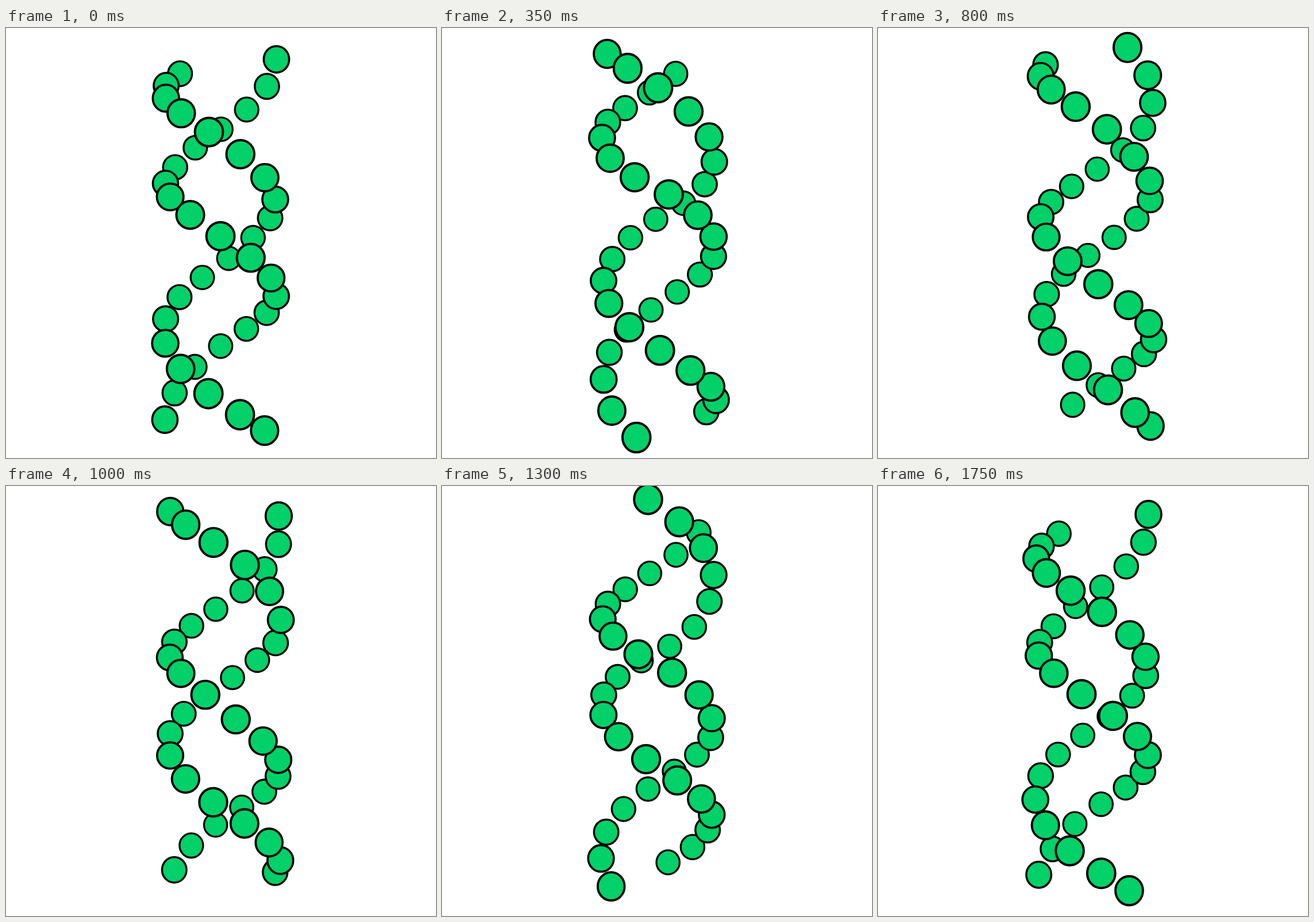
An HTML page with a canvas for the animation above (1.8 s loop, 748 by 748 pixels).

```html
<!DOCTYPE html>
<html lang="en">
<head>
<meta charset="utf-8">
<title>Double helix</title>
<style>
  html, body { margin: 0; height: 100%; overflow: hidden; background: #fff; }
  canvas { display: block; }
</style>
</head>
<body>
<canvas id="stage" width="748" height="748"></canvas>
<script>
const SIZE = 748;
const ctx = document.getElementById('stage').getContext('2d');
const AXIS = 376.7, MIDDLE = 362, DEPTH = 1030, TILT = 0.012;
const RADIUS = 96.5, RISE = 34.3, PER_TURN = 12, BEADS = 19;
const STEP_MS = 50, STEPS = 36;
const TURN = 2 * Math.PI;

// Each strand has one kink per turn, at bead number `kink`, moved down by `lift`
const strands = [
  { phase: 90, shift: -3.3, drop: 1.3, kink: 5.5, lift: 11 },
  { phase: -130, shift: -5, drop: 8.6, kink: 8.4, lift: -8 }
];

function bump(i, centre) {
  const turns = (i - centre) / PER_TURN;
  const distance = (turns - Math.round(turns)) * PER_TURN;
  return Math.exp(-((distance / 1.3) ** 2));
}

function makeBead({ phase, shift, drop, kink, lift }, i) {
  const angle = (phase / 360 + i / PER_TURN) * TURN;
  const k = bump(i, kink);
  const y = (i - 9) * RISE + drop + lift * k;
  // The helix leans slightly away from the axis it spins on
  return {
    x: RADIUS * Math.sin(angle) + shift - 0.0017 * y,
    y,
    z: RADIUS * Math.cos(angle) + 2.8 - 7 * k + 0.0081 * y
  };
}

const beads = strands.flatMap(strand =>
  Array.from({ length: BEADS }, (_, i) => makeBead(strand, i)));

function project({ x, y, z }, angle) {
  const c = Math.cos(angle), s = Math.sin(angle);
  const depth = z * c - x * s;
  const scale = DEPTH / (DEPTH - depth);
  return {
    x: AXIS + (x * c + z * s) * scale,
    y: MIDDLE + (y - TILT * depth) * scale,
    depth, scale
  };
}

function drawBead({ x, y, scale }) {
  const r = 22.1 * scale;
  const stretch = Math.hypot(1, (y - MIDDLE) / DEPTH); // spheres lengthen off centre
  ctx.lineWidth = 3.6 * scale;
  ctx.beginPath();
  ctx.ellipse(x, y, r, r * stretch, 0, 0, TURN);
  ctx.fill();
  ctx.stroke();
}

function draw() {
  const step = Math.floor(performance.now() / STEP_MS) % STEPS;
  const angle = step / STEPS * TURN;
  ctx.fillStyle = '#fff';
  ctx.fillRect(0, 0, SIZE, SIZE);
  ctx.fillStyle = '#02d068';
  ctx.strokeStyle = '#000';
  beads.map(b => project(b, angle)).sort((a, b) => a.depth - b.depth).forEach(drawBead);
  requestAnimationFrame(draw);
}
draw();
</script>
</body>
</html>
```
